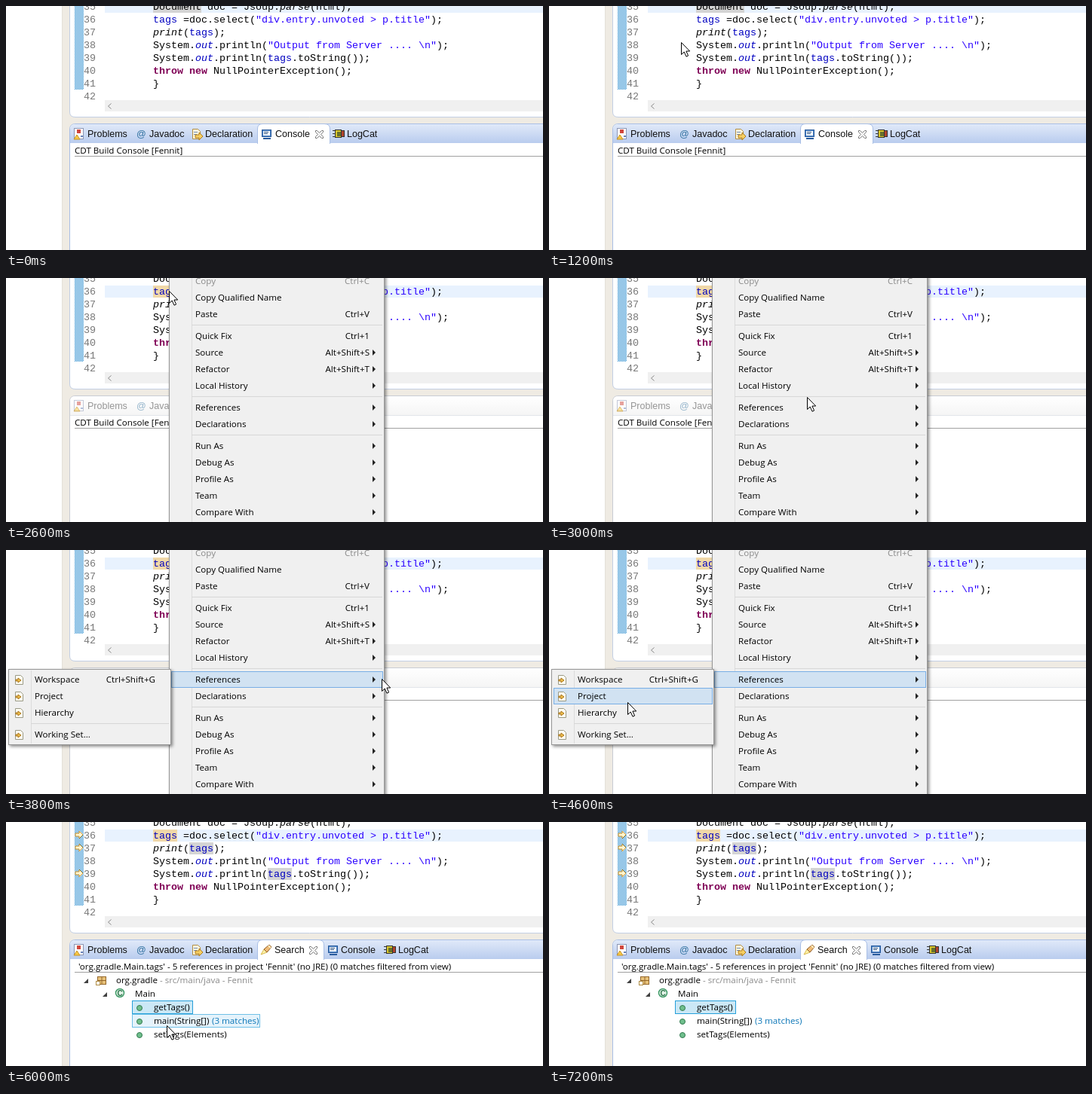
Recreate the animation shown at these times as an HTML page with a canvas. Size 712 px wide and 324 px high, loop 7.4 s.

```html
<!DOCTYPE html>
<html lang="en">
<head>
<meta charset="utf-8">
<style>
html, body { margin: 0; width: 100%; height: 100%; overflow: hidden; background: #fff; }
canvas { display: block; }
</style>
</head>
<body>
<canvas id="stage" width="712" height="324"></canvas>
<script>
const g = document.getElementById('stage').getContext('2d');
const LOOP = 7400, STEP = 200;
const UI = '11.6px "Open Sans", sans-serif';
const TAB = '12.5px "Liberation Sans", sans-serif';
const MONO = '13.333px "Liberation Mono", monospace';
const BLUE = '#0000c0', STRING = '#2a00ff', KEYWORD = '#7f0055';

// Pointer stops: time, x, y
const pointer = [
  [200, 694, 250], [600, 430, 160], [1000, 150, 70], [1400, 200, 26], [1800, 216, 17],
  [2600, 216, 17], [3000, 342, 158], [3400, 400, 171], [3800, 498, 171], [4400, 150, 185],
  [4600, 104, 202], [4800, 104, 202], [5200, 161, 190], [5600, 195, 245], [6000, 213, 270],
  [6200, 240, 262], [6600, 388, 160], [7000, 310, 304], [7200, 290, 324]
];

function pointerAt(t) {
  if (t < 200 || t >= 7200) return null;
  const i = pointer.findIndex(p => p[0] > t);
  const [a, b] = [pointer[i - 1], pointer[i]];
  const k = (t - a[0]) / (b[0] - a[0]);
  return { x: Math.round(a[1] + (b[1] - a[1]) * k), y: Math.round(a[2] + (b[2] - a[2]) * k) };
}

const inside = (p, x, y, w, h) => p && p.x >= x && p.x < x + w && p.y >= y && p.y < y + h;

function box(x, y, w, h, fill, line) {
  if (fill) { g.fillStyle = fill; g.fillRect(x, y, w, h); }
  if (line) { g.strokeStyle = line; g.lineWidth = 1; g.strokeRect(x + .5, y + .5, w - 1, h - 1); }
}

// Text centred on row y
function text(s, x, y, color = '#000', font = UI, align = 'left') {
  g.font = font;
  g.fillStyle = color;
  g.textAlign = align;
  g.fillText(s, x, y + 4);
}

function shape(d, fill, line, x = 0, y = 0, width = 1) {
  g.save();
  g.translate(x, y);
  const path = new Path2D(d);
  if (fill) { g.fillStyle = fill; g.fill(path); }
  if (line) { g.strokeStyle = line; g.lineWidth = width; g.stroke(path); }
  g.restore();
}

function dot(x, y, r, fill, line, width = 1) {
  g.beginPath();
  g.arc(x, y, r, 0, 7);
  g.fillStyle = fill;
  g.fill();
  g.strokeStyle = line;
  g.lineWidth = width;
  g.stroke();
}

function gradient(y0, y1, a, b) {
  const fill = g.createLinearGradient(0, y0, 0, y1);
  fill.addColorStop(0, a);
  fill.addColorStop(1, b);
  return fill;
}

function code(y, ...parts) {
  let x = 195;
  for (const [s, color = '#000', style = ''] of parts) {
    text(s, x, y, color, `${style} ${MONO}`);
    x += s.length * 8;
  }
}

const arrow = 'M0 -2h5v-3l5 5-5 5v-3h-5z';

function editor(t) {
  const clicked = t >= 1800, marked = t >= 2400, found = t >= 5400;
  shape('M84.5 -1V141Q84.5 147.5 92 147.5H713V-1z', '#fff', '#c3cfe4');
  for (let y = 0; y < 111; y++)
    for (let x = 91 + y % 2; x < 103; x += 2) box(x, y, 1, 1, '#2f8fd0');
  box(131, clicked ? 10 : -7, 581, 16, '#e8f2fe');
  if (!marked) box(195, -7, 64, 16, '#d4d4d4');
  else {
    box(195, 10, 32, 16, '#f0d8a8');
    box(243, 27, 32, 16, '#d4d4d4');
    box(347, 61, 32, 16, '#d4d4d4');
  }
  for (let i = 0; i < 8; i++) text(35 + i, 103, 1 + 17 * i, '#787878', MONO);
  code(1, ['Document doc = Jsoup.'], ['parse', '#000', 'italic'], ['(html);']);
  code(18, ['tags', BLUE], [' =doc.select('], ['"div.entry.unvoted > p.title"', STRING], [');']);
  code(35, ['print', '#000', 'italic'], ['('], ['tags', BLUE], [');']);
  code(52, ['System.'], ['out', BLUE, 'italic'], ['.println('], ['"Output from Server .... \\n"', STRING], [');']);
  code(69, ['System.'], ['out', BLUE, 'italic'], ['.println('], ['tags', BLUE], ['.toString());']);
  code(86, ['throw new', KEYWORD, 'bold'], [' NullPointerException();']);
  code(103, ['}']);
  if (clicked && !marked) box(219, 10, 1, 16, '#000');
  if (found) for (const y of [17, 34, 68]) shape(arrow, '#fff6d0', '#c8902c', 92, y);
  box(131, 125, 581, 15, '#f0f0f0');
  shape('M139.5 129.5l-4 3.5 4 3.5', null, '#8a8a8a');
}

const icons = {
  problems(x) {
    box(x, 162, 13, 15, '#fff', '#8c96b4');
    box(x + 4, 164, 5, 5, '#d0463c');
    shape('M4 9l4 6H0z', '#f7c948', '#c79222', x, 162);
    box(x + 9, 172, 3, 2, '#6a86bd');
  },
  javadoc(x) { text('@', x, 170, '#2d6f9e', TAB); },
  declaration(x) {
    shape('M.5 .5h7l3 3v10H.5z', '#fff8dc', '#b08d45', x, 163);
    box(x + 2, 167, 5, 1, '#6a86bd');
    box(x + 2, 170, 4, 1, '#6a86bd');
    shape(arrow, '#f6cf62', '#ad7b1c', x + 4, 173);
  },
  console(x) {
    box(x, 164, 13, 10, '#f5faff', '#285b9d');
    box(x + 1, 165, 11, 8, null, '#4a80c2');
    box(x + 3, 167, 6, 1, '#33547f');
    box(x + 3, 169, 5, 1, '#33547f');
    box(x + 2, 175, 10, 2, '#285b9d');
  },
  search(x) {
    shape('M0 14l4-7 4 4z', '#fff3a8', '#d8b94c', x, 162);
    shape('M4 7l7-6 3 3-6 7z', '#f0bd78', '#8f5a22', x, 162);
    shape('M10 2l3 3', null, '#fff0c4', x, 162, 2);
  },
  logcat(x) {
    shape('M0 .5h4M0 4.5h4M0 8.5h4', null, '#333', x, 165);
    box(x + 3, 164, 9, 11, '#d8c62d', '#333');
    box(x + 6, 167, 6, 6, '#67702c');
    box(x + 11, 165, 5, 9, '#b2442c', '#333');
  }
};

function tab(icon, ix, label, x, active, selected) {
  g.globalAlpha = active || selected ? 1 : .5;
  icons[icon](ix);
  g.globalAlpha = 1;
  text(label, x, 170, active || selected ? '#111' : '#969696', TAB);
}

function tabStrip(active, searching) {
  const edge = active ? '#a9bfe6' : '#c8ccd4';
  shape('M84.5 325V164Q84.5 156.5 92 156.5H713V325z', '#fff', edge);
  shape('M85 182V164Q85 157 92 157H712V182z',
    active ? gradient(157, 182, '#e0e9f9', '#b9ccee') : gradient(157, 182, '#fff', '#f5f5f5'));
  if (!active) box(85, 182, 627, 1, '#e2e5ea');
  const right = searching ? 421 : 429;
  shape(`M333.5 183V163Q333.5 156.5 340 156.5H${right - 7}Q${right}.5 156.5 ${right}.5 163V183`,
    active ? '#fff' : gradient(157, 183, '#e7ebf2', '#fff'), edge);
  tab('problems', 90, 'Problems', 108, active);
  tab('javadoc', 173, 'Javadoc', 190, active);
  tab('declaration', 247, 'Declaration', 264, active);
  if (searching) {
    tab('search', 338, 'Search', 356, active, true);
    tab('console', 427, 'Console', 444, active);
    tab('logcat', 501, 'LogCat', 520, active);
  } else {
    tab('console', 339, 'Console', 357, active, true);
    tab('logcat', 433, 'LogCat', 452, active);
  }
  shape('M0 0h2l3 3 3-3h2v2L7 5l3 3v2H8L5 7l-3 3H0V8l3-3-3-3z', '#fff', '#777', right - 18.5, 165.5);
}

function results(p) {
  const rows = [['getTags()', 246, 81], ['main(String[])', 264, 170], ['setTags(Elements)', 282, 127]];
  shape('M6 0v6H0z', '#404040', null, 103, 208);
  shape('M6 0v6H0z', '#404040', null, 128, 226);
  box(121, 205, 12, 11, '#e8c27a', '#94672b');
  shape('M127 205v11M121 210.5h12', null, '#94672b');
  box(119, 211, 6, 6, '#fff', '#b08d45');
  text('org.gradle', 146, 210);
  text('- src/main/java - Fennit', 204, 210, '#8a8a8a');
  dot(151, 227, 5.5, '#e4f3e9', '#3f9a67', 1.5);
  text('C', 151, 227, '#2a7448', 'bold 10px "Liberation Sans", sans-serif', 'center');
  text('Main', 171, 228);
  rows.forEach(([label, y, w], i) => {
    if (i === 0) box(167, y - 9, w, 18, '#cbe8f6', '#26a0da');
    else if (inside(p, 167, y - 9, w, 18)) box(167, y - 9, w, 18, '#e5f3fb', '#70c0e7');
    dot(177, y + 1, 3.5, '#6fbf8c', '#347a50');
    text(label, 196, y);
  });
  text('(3 matches)', 273, 264, '#0d77b8');
}

function view(t, p) {
  const searching = t >= 5000, found = t >= 5400;
  tabStrip(t < 1800 || searching, searching);
  box(91, 199, 621, 1, '#a0a0a0');
  if (!searching) return text('CDT Build Console [Fennit]', 91, 192);
  const count = found ? 5 : 0, note = found ? '0 matches filtered from view' : 'Filtered';
  text(`'org.gradle.Main.tags' - ${count} references in project 'Fennit' (no JRE) (${note})`, 96, 192);
  if (found) return results(p);
  g.setLineDash([1, 1]);
  box(95, 203, 65, 16, null, '#000');
  g.setLineDash([]);
  text('Searching...', 97, 211);
}

// Label, row centre, shortcut, has submenu
const menu = [
  ['Copy', 4, 'Ctrl+C'], ['Copy Qualified Name', 26], ['Paste', 48, 'Ctrl+V'],
  ['Quick Fix', 77, 'Ctrl+1'], ['Source', 99, 'Alt+Shift+S', 1], ['Refactor', 121, 'Alt+Shift+T', 1],
  ['Local History', 143, '', 1], ['References', 172, '', 1], ['Declarations', 194, '', 1],
  ['Run As', 223, '', 1], ['Debug As', 245, '', 1], ['Profile As', 267, '', 1],
  ['Team', 289, '', 1], ['Compare With', 311, '', 1]
];
const submenu = [['Workspace', 172, 'Ctrl+Shift+G'], ['Project', 194], ['Hierarchy', 216], ['Working Set...', 245]];

function panel(x, y, w, h, gutter, lines) {
  g.save();
  g.shadowColor = 'rgba(0,0,0,.45)';
  g.shadowBlur = 4;
  g.shadowOffsetX = g.shadowOffsetY = 2;
  box(x, y, w, h, '#f0f0f0');
  g.restore();
  box(x, y, w, h, null, '#979797');
  box(gutter, y + 2, 1, h - 4, '#dcdcdc');
  for (const line of lines) box(gutter, line, x + w - gutter - 3, 1, '#d7d7d7');
}

function menus(t, p) {
  const open = t >= 3600;
  panel(216, -4, 286, 334, 246, [62, 157, 208]);
  for (const [label, y, keys, more] of menu) {
    const hot = open ? label === 'References' : inside(p, 217, y - 10, 284, 21);
    if (hot) box(219, y - 11, 281, 22, '#d1e2f2', '#78aee5');
    const color = label === 'Copy' ? '#8a8a8a' : '#000';
    text(label, 251, y, color);
    if (keys) text(keys, 482, y, color, UI, 'right');
    if (more) shape('M0 -4l4 4-4 4z', '#222', null, 486, y);
  }
  if (!open) return;
  panel(3, 158, 216, 101, 33, [230]);
  for (const [label, y, keys] of submenu) {
    if (inside(p, 4, y - 11, 214, 22)) box(6, y - 11, 211, 22, '#d1e2f2', '#78aee5');
    shape('M.5 .5h7l3 3v9H.5z', '#fffdf2', '#9a9a86', 12, y - 6);
    shape('M0 -1h3v-2l4 3-4 3v-2H0z', '#f0c04c', '#a7731d', 13, y + 1);
    text(label, 38, y);
    if (keys) text(keys, 198, y, '#000', UI, 'right');
  }
}

function draw(t) {
  const p = pointerAt(t);
  box(0, 0, 712, 324, '#fff');
  box(75, 0, 637, 324, '#efebe3');
  box(74, 0, 1, 324, '#e3e0d9');
  editor(t);
  view(t, p);
  if (t >= 2600 && t < 5000) menus(t, p);
  if (p) shape('M.5 .5V16.5L4.2 13 7 19.2 9.6 18 6.900 12H11.7z', '#fff', '#000', p.x, p.y);
}

function tick() {
  draw(Math.floor(performance.now() % LOOP / STEP) * STEP);
  requestAnimationFrame(tick);
}
tick();
</script>
</body>
</html>
```
